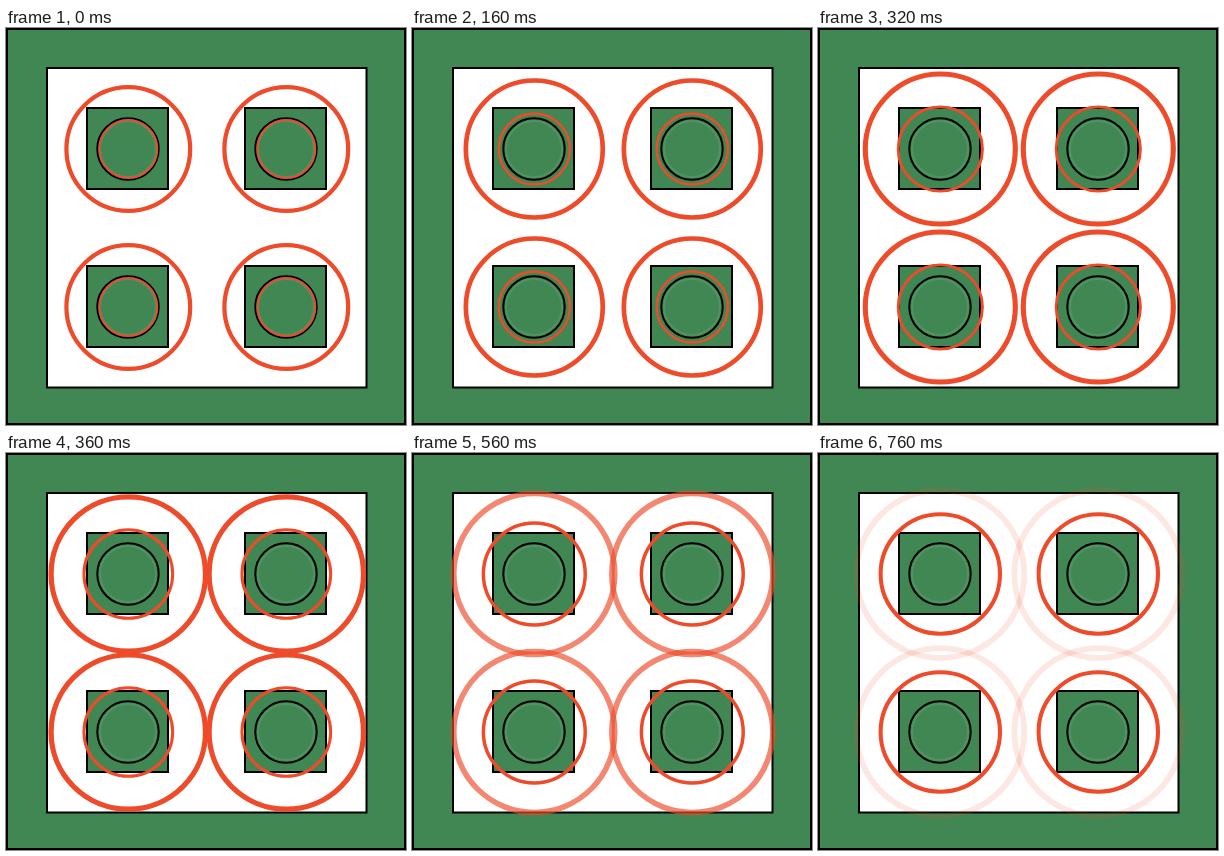
An HTML page with a canvas for the animation above (0.8 s loop, 400 px wide and 397 px high).

```html
<!DOCTYPE html>
<html lang="en">
<head>
<meta charset="utf-8">
<title>Pulsing rings</title>
<style>
  html, body { margin: 0; width: 100%; height: 100%; overflow: hidden; }
  canvas { display: block; }
</style>
</head>
<body>
<canvas id="stage" width="400" height="397"></canvas>
<script>
const ctx = document.getElementById('stage').getContext('2d');
const GREEN = '#408753', RED = '#ee4b2b', LOOP = 800, STEPS = 15;
const centers = [[122, 121], [280, 121], [122, 279], [280, 279]];

function box(x, y, w, h, fill) {
  ctx.fillStyle = fill;
  ctx.strokeStyle = '#000';
  ctx.lineWidth = 2;
  ctx.fillRect(x, y, w, h);
  ctx.strokeRect(x, y, w, h);
}

function circle(x, y, r, width, color) {
  ctx.beginPath();
  ctx.arc(x, y, r, 0, 2 * Math.PI);
  ctx.lineWidth = width;
  ctx.strokeStyle = color;
  ctx.stroke();
}

// A ring grows steadily for three quarters of its life, then slows and fades.
function ring(x, y, step) {
  const late = Math.max(0, step - 22.5);
  const outer = 30 + Math.min(step, 22.5) * 34 / 15 + late * 0.9;
  const width = outer * 0.066;
  ctx.globalAlpha = 1 - late / 7.5;
  circle(x + 0.3, y, outer - width / 2, width, RED);
  ctx.globalAlpha = 1;
}

function draw(now) {
  // Three growth steps in every four ticks of 40 ms.
  const tick = Math.floor((now % LOOP) / 40);
  const step = Math.floor(tick * 0.75 + 0.3);

  box(1, 1, 398, 395, GREEN);
  box(41, 40, 319.5, 319.5, '#fff');
  for (const [x, y] of centers) {
    box(x - 41, y - 41, 81, 81, GREEN);
    circle(x, y, 28, 2, 'rgba(255,255,255,0.09)');
    circle(x, y, 30.7, 2, '#000');
  }
  for (const [x, y] of centers) {
    ring(x, y, step + STEPS);
    ring(x, y, step);
  }
}

const start = performance.now();
function loop() {
  draw(performance.now() - start);
  requestAnimationFrame(loop);
}
loop();
</script>
</body>
</html>
```
